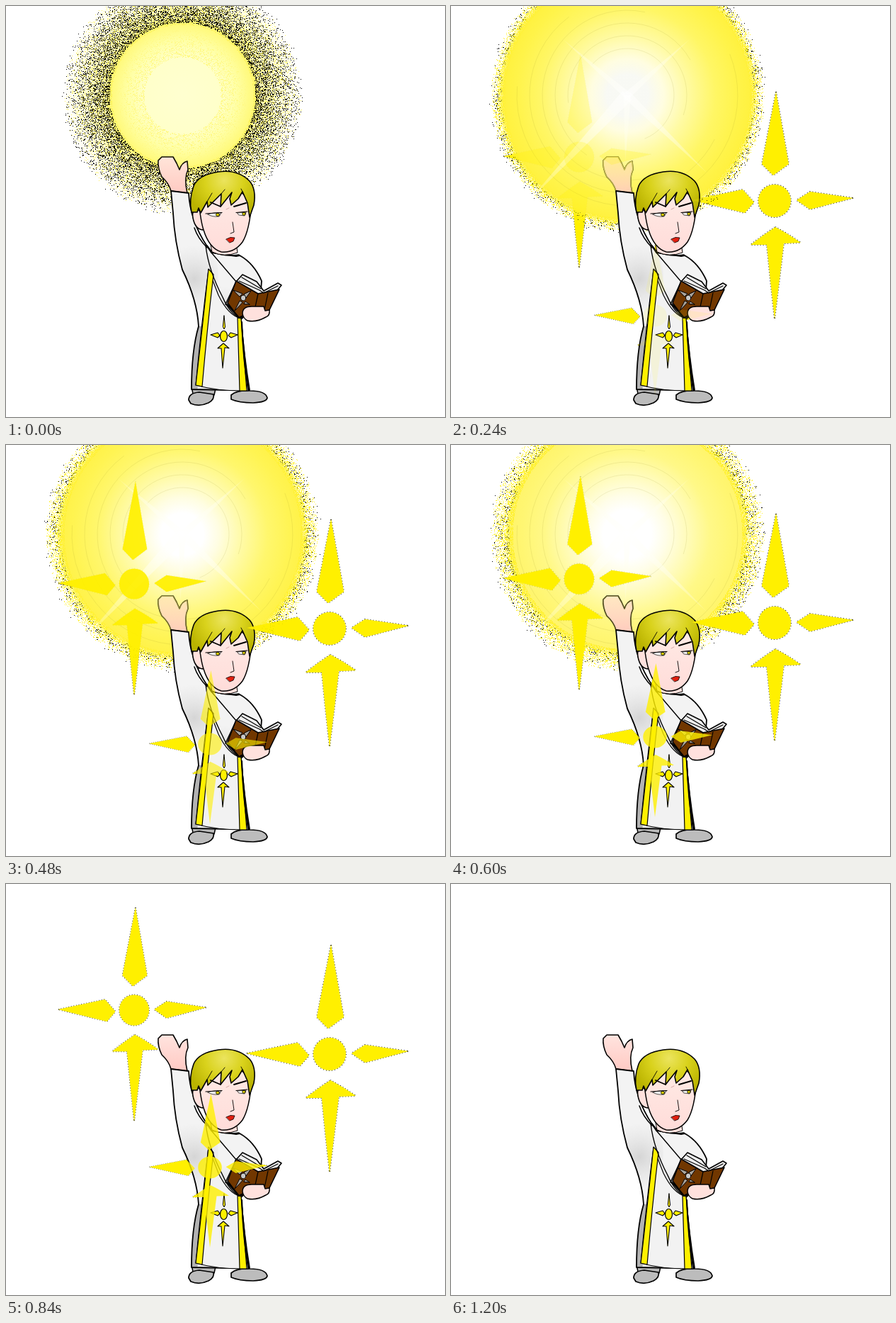
Animation, 620 px wide and 580 px high, one loop 1320 ms. Source, as an HTML page with a canvas:

```html
<!DOCTYPE html>
<html lang="en">
<head>
<meta charset="utf-8">
<title>Blessing of light</title>
<style>
html, body { margin: 0; width: 100%; height: 100%; overflow: hidden; background: #fff; }
canvas { display: block; }
</style>
</head>
<body>
<canvas id="stage" width="620" height="580"></canvas>
<script>
const ctx = document.getElementById('stage').getContext('2d');
const STEP = 120, STEPS = 11;
const YELLOW = '#fff000', SKIN = '#ffe1dd', BROWN = '#713700';
const GLOW = { x: 249, y: 126 };

function shape(d, fill, line = 0, color = '#000') {
  const p = new Path2D(d);
  if (fill) { ctx.fillStyle = fill; ctx.fill(p); }
  if (line) { ctx.lineWidth = line; ctx.strokeStyle = color; ctx.stroke(p); }
}

function oval(x, y, rx, ry, fill, line = 0) {
  ctx.beginPath();
  ctx.ellipse(x, y, rx, ry, 0, 0, Math.PI * 2);
  ctx.fillStyle = fill;
  ctx.fill();
  if (line) { ctx.lineWidth = line; ctx.strokeStyle = '#000'; ctx.stroke(); }
}

function radial(x, y, r, stops) {
  const g = ctx.createRadialGradient(x, y, 0, x, y, r);
  stops.forEach(([at, c]) => g.addColorStop(at, c));
  return g;
}

function vertical(y0, y1, a, b) {
  const g = ctx.createLinearGradient(0, y0, 0, y1);
  g.addColorStop(0, a);
  g.addColorStop(1, b);
  return g;
}

function random(seed) {
  return () => {
    seed = (seed * 1664525 + 1013904223) >>> 0;
    return seed / 4294967296;
  };
}

// Four-armed star, given by its centre, scale, heights and strength at each step.
const STAR = new Path2D(
  'M2-154L20-52L-2-36L-18-52Z M111-4L50 12L31-1L50-13Z ' +
  'M-117-1L-45-16L-29 2L-42 17Z M1 37Q17 45 37 59L13 60L7 110L0 167L-6 112L-11 62L-34 62Q-16 48 1 37Z ' +
  'M23 0A23 23 0 1 1-23 0A23 23 0 1 1 23 0Z');
const fade = [0, .08, .2, .55, .92, 1, 1, .6, 0, 0, 0];
const stars = [
  { x: 181, sx: .915, sy: .94, y: [230, 223, 213, 204, 196, 189, 182, 178], a: fade },
  { x: 457, sx: 1, sy: 1, y: [286, 280, 275, 267, 259, 251, 244, 240], a: fade },
  { x: 288, sx: .73, sy: .676, y: [0, 0, 437, 430, 422, 412, 403, 400, 398, 395],
    a: [0, 0, .1, .35, .6, .8, 1, .8, .55, .25, 0] }
];

function drawStar(s, step, alpha, rim) {
  if (!s.a[step]) return;
  ctx.save();
  ctx.globalAlpha = alpha;
  ctx.translate(s.x, s.y[step]);
  ctx.scale(s.sx, s.sy);
  if (rim) {
    ctx.setLineDash([1, 3]);
    ctx.lineCap = 'butt';
    ctx.lineWidth = 2;
    ctx.strokeStyle = '#222';
    ctx.stroke(STAR);
  }
  ctx.fillStyle = YELLOW;
  ctx.fill(STAR);
  ctx.restore();
}

// Spray of single dots, thinning out from the inner to the outer radius.
function spray(inner, outer, density, color, seed) {
  const rnd = random(seed);
  ctx.fillStyle = color;
  for (let y = 0; y < GLOW.y + outer; y++) {
    for (let x = GLOW.x - outer; x < GLOW.x + outer; x++) {
      const r = Math.hypot(x - GLOW.x, y - GLOW.y);
      if (r < inner || r > outer) continue;
      if (rnd() < density * (outer - r) / (outer - inner)) ctx.fillRect(x, y, 1, 1);
    }
  }
}

function ray(x, y, w) {
  const a = Math.atan2(y - GLOW.y, x - GLOW.x) + Math.PI / 2;
  const dx = w * Math.cos(a), dy = w * Math.sin(a);
  const far = Math.hypot(x - GLOW.x, y - GLOW.y);
  ctx.beginPath();
  ctx.moveTo(GLOW.x + dx, GLOW.y + dy);
  ctx.lineTo(x, y);
  ctx.lineTo(GLOW.x - dx, GLOW.y - dy);
  ctx.fillStyle = radial(GLOW.x, GLOW.y, far, [[0, '#fff'], [.6, 'rgba(255,255,235,.7)'], [1, 'rgba(255,255,225,.35)']]);
  ctx.fill();
}

function disc(r, stops) {
  oval(GLOW.x, GLOW.y, r, r, radial(GLOW.x, GLOW.y, r, stops));
}

function firstGlow() {
  disc(168, [[0, '#ffffd0'], [.31, '#ffffca'], [.45, '#ffffa8'], [.58, '#fffa80'],
    [.62, '#fff978'], [.65, 'rgba(255,246,110,.45)'], [1, 'rgba(255,246,110,0)']]);
  spray(54, 104, .3, '#fff984', 3);
  spray(100, 170, .5, '#fff35e', 5);
  spray(103, 172, .42, '#000', 11);
}

function fullGlow(step) {
  const core = [0, .13, .16, .16, .17, .2][step];
  const edge = [0, 179, 183, 181, 177, 172][step];
  const heart = step === 2 ? '#f8f9f4' : '#fff';
  spray(edge - 10, 194, .75, '#fff12e', 21);
  spray(edge - 5, 197, .09, '#000', 30 + step);
  ctx.save();
  ctx.globalAlpha = [0, 1, .97, .95, .92, .75][step];
  disc(edge, [[0, heart], [core, heart], [core + .12, '#fffde0'],
    [core + .3, '#fffaa0'], [.68, '#fff660'], [.86, '#fff344'],
    [.95, '#fff13a'], [1, 'rgba(255,241,50,.2)']]);
  ctx.globalAlpha = .13;
  ctx.strokeStyle = '#8d8620';
  ctx.lineWidth = 1;
  for (let r = 66; r < 170; r += 18) {
    ctx.beginPath();
    ctx.arc(GLOW.x, GLOW.y, r, .7 + r, 4.3 + r);
    ctx.stroke();
  }
  ctx.globalAlpha = .6;
  ray(158, 47, 5);
  ray(337, 47, 5);
  ray(362, 236, 6);
  ray(108, 277, 9);
  ray(246, 222, 5);
  ctx.restore();
}

function drawGlow(step) {
  if (step === 0) firstGlow();
  else if (step < 6) fullGlow(step);
}

const HAND = 'M233 261Q230 250 220 241Q214 229 215 218L220 213L236 213L241 222L245 231Q248 221 256 219L257 231Q251 243 256 264Z';
const ROBE = 'M233 261L258 264Q260 303 284 339L290 348L325 353L330 352Q350 363 361 388L359 415L332 442Q336 493 344 542L318 542L262 541Q262 486 272 452Q270 415 249 372Q238 332 236 292Z';

function drawRobe() {
  // Legs and shoes
  shape('M262 537L296 540L294 549L264 547Z', '#b8b8b8', 1.5);
  shape('M258 556Q258 546 273 545L293 548Q295 555 286 560Q273 566 261 561Z', '#bcbcbc', 1.7);
  shape('M318 549Q326 542 344 543Q367 543 369 553Q368 559 349 560Q329 560 318 555Z', '#bcbcbc', 1.7);
  shape(ROBE, '#f3f3f3');
  ctx.save();
  ctx.clip(new Path2D(ROBE));
  oval(266, 380, 34, 48, radial(266, 385, 48, [[0, '#d5d5d5'], [1, 'rgba(225,225,225,0)']]));
  oval(305, 425, 28, 30, radial(305, 425, 30, [[0, '#dedede'], [1, 'rgba(230,230,230,0)']]));
  shape('M270 452L280 452L270 545L258 545Z', '#b2b2b2');
  ctx.restore();
  shape(ROBE, null, 1.8);

  // Stole
  shape('M286 372L300 408Q314 437 332 441L342 543Q300 544 268 535Q276 450 286 372Z', '#f2f2f2', 1.2);
  shape('M286 371L293 379Q284 456 277 537L268 535Q277 458 286 371Z', YELLOW, 1.2);
  shape('M327 440L332 441L340 543L330 543Z', YELLOW, 1.2);
  shape('M333 446Q335 500 342 541', null, 2);

  // Sash and collar
  shape('M282 338Q286 373 306 411Q316 434 330 440M290 348L325 389M284 338L291 347Q309 354 329 351', null, 1.4);
  shape('M266 313Q271 328 284 341', null, 1.5);

  // Emblem
  shape('M308 437L309.5 453L308 456L306.5 453Z', YELLOW, 1);
  shape('M289 464L299 461L302 465L299 468ZM314 465L317 461L327 464L318 468Z', YELLOW, 1.1);
  shape('M307 476L315 483L309 482L306 511L304 483L299 483Z', YELLOW, 1.1);
  oval(307.5, 466, 5, 7.5, YELLOW, 1.2);
}

function drawHead() {
  shape('M289 337L291 347Q308 355 327 348L325 335Z', SKIN, 1);
  shape('M271 287Q262 286 264 299Q267 315 278 316L285 301Z', SKIN, 1.5);
  shape('M272 275Q275 304 279 316Q287 342 304 347Q322 349 334 333Q344 317 347 277L324 255L288 257Z',
    vertical(270, 347, '#ffe9e4', '#ffdcd9'), 1.5);
  shape('M262 291Q258 273 265 254Q272 238 300 234Q327 230 344 247Q354 259 350 281L344 298L341 278L334 262L328 272L318 281L316 272L319 263L303 283L304 265L285 284L284 276L275 292L272 285L270 291Z',
    radial(308, 246, 54, [[0, '#ebe45e'], [.5, '#d9d21c'], [1, '#bab300']]), 1.6);
  shape('M284 276L291 264M304 265L309 259M334 262L332 258', null, .9);

  // Eyes
  shape('M289 277L303 283M322 283L339 278', null, 1.9);
  shape('M285 294Q293 291 304 292L301 297Q291 298 285 294ZM327 292L339 291L337 296L329 295Z', '#fff', .7);
  oval(299, 294.5, 2.6, 2.2, '#d8ca00', .8);
  oval(336, 293.3, 2.3, 2.1, '#d8ca00', .8);
  shape('M282 293L305 291.5M325 291.5L341 290', null, 1.2);
  shape('M311 287L315 285', null, .8, '#c99');

  // Nose and mouth
  shape('M320 305L322 319L317 321', null, .9);
  shape('M311 329L317 326.5L323 327L321 332L316 334Z', '#e22010', .8);
}

function drawBook() {
  shape('M310 421L325 389L334 379L354 389L364 402L384 391L389 394L380 405L362 412L320 426Z', '#eee', 1.6);
  shape('M313 419L325 388L356 406L386 400L371 431L348 437L329 440Z', BROWN, 1.6);
  shape('M312 421L329 440L335 437', null, 2);
  shape('M356 406L350 434M329 388L358 401L364 405L384 395M333 383L360 399M370 405L365 429', null, 1.2);
  // Cover emblem
  shape('M321 401L334 406L330 410ZM346 402L339 412L336 407ZM323 430L330 416L334 418ZM344 421L338 417L336 420Z', '#a9a49d', 1);
  oval(335, 412, 3.6, 4, '#c9c9c9', 1);
  shape('M334 434Q334 424 347 424L364 424L366 430L372 429Q373 437 367 439Q353 447 341 444Q335 441 334 434Z', SKIN, 1.5);
}

function drawPriest(step) {
  shape(HAND, vertical(213, 264, '#ffe4df', '#ffc9c3'), 1.6);
  const tint = [.05, .4, .65, .5, .4, .25][step] || 0;
  if (tint) {
    ctx.save();
    ctx.globalAlpha = tint;
    shape(HAND, vertical(212, 268, '#fff36a', 'rgba(255,240,90,.15)'), 1.5, '#fff36a');
    ctx.restore();
  }
  drawRobe();
  drawHead();
  drawBook();
}

function draw(step) {
  ctx.globalAlpha = 1;
  ctx.fillStyle = '#fff';
  ctx.fillRect(0, 0, 620, 580);
  ctx.lineJoin = ctx.lineCap = 'round';
  stars.forEach(s => drawStar(s, step, 1, true));
  drawGlow(step);
  drawPriest(step);
  stars.forEach(s => drawStar(s, step, s.a[step]));
}

let shown = -1;
const start = performance.now();
function tick(now) {
  const step = Math.floor(Math.max(0, now - start) / STEP) % STEPS;
  if (step !== shown) draw(shown = step);
  requestAnimationFrame(tick);
}
draw(shown = 0);
requestAnimationFrame(tick);
</script>
</body>
</html>
```
